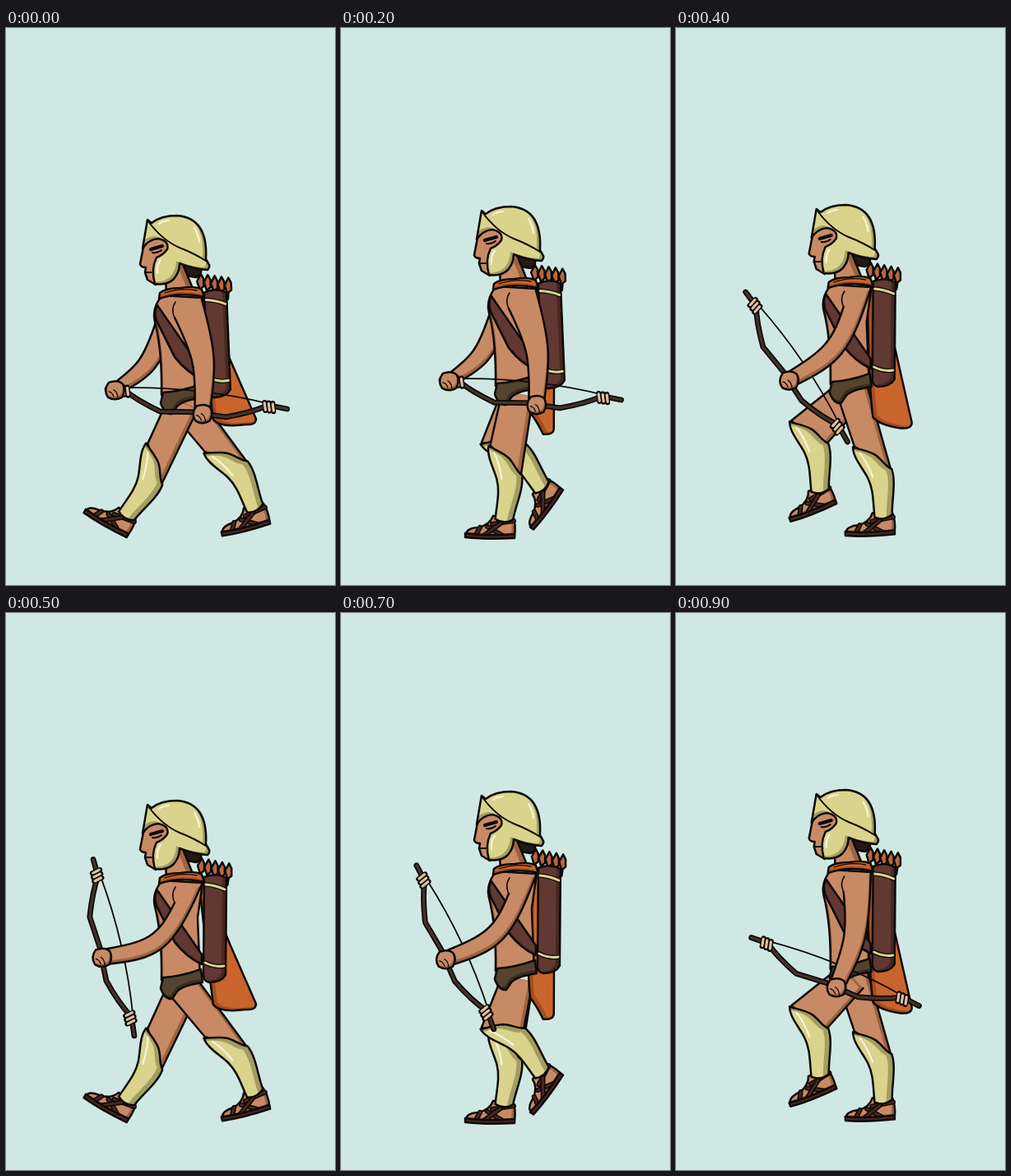
Recreate the animation shown at these times as an HTML page with a canvas. Size 400 by 677 pixels, loop 1000 ms.

```html
<!DOCTYPE html>
<html lang="en">
<head>
<meta charset="utf-8">
<title>Walking archer</title>
<style>
html, body { margin: 0; width: 100%; height: 100%; overflow: hidden; background: #d0e8e4; }
canvas { display: block; width: 400px; height: 677px; }
</style>
</head>
<body>
<canvas id="stage"></canvas>
<script>
const canvas = document.getElementById('stage');
const c = canvas.getContext('2d');
const ratio = window.devicePixelRatio || 1;
canvas.width = 400 * ratio;
canvas.height = 677 * ratio;

const BG = '#d0e8e4', INK = '#0d0907';
const SKIN = '#c78a65', SKIN_D = '#9c633f';
const GOLD = '#dad38b', GOLD_D = '#a49d62', SHINE = '#f7f4dc';
const LEATHER = '#613832', LEATHER_D = '#472722';
const CLOTH = '#c9652c', CLOTH_D = '#a54e20';
const WOOD = '#46322a', BELT = '#55432f', BELT_D = '#3a2d20', TAPE = '#dcc0a0';

const POSES = 10, STEP = 100, RAD = Math.PI / 180;
// rise and fall of the body over one step
const BOB = [0, 4, -11, -14, -13];
// one leg through a full stride: ankle x, ankle y, shin tilt
const STRIDE = [
  [145, 593, 16], [187, 597, -12], [197, 598, -11], [226, 597, -17], [251, 594, -23],
  [302, 585, -42], [303, 560, -56], [244, 560, -54], [213, 566, -40], [174, 563, -23]
];

const mix = (p, q, t) => [p[0] + (q[0] - p[0]) * t, p[1] + (q[1] - p[1]) * t];
const add = (p, q, k = 1) => [p[0] + q[0] * k, p[1] + q[1] * k];
const polar = (deg, size) => [Math.cos(deg * RAD) * size, Math.sin(deg * RAD) * size];
// cosine over the loop, `n` waves, with its crest at `peak`
const wave = (i, peak, n = 1) => Math.cos(2 * Math.PI * n * (i - peak) / POSES);

function normal(p, q) {
  const dx = q[0] - p[0], dy = q[1] - p[1], size = Math.hypot(dx, dy);
  return [-dy / size, dx / size];
}

function line(d, color = INK, width = 2) {
  c.strokeStyle = color;
  c.lineWidth = width;
  c.stroke(new Path2D(d));
}

function part(d, fill, shade, dx = -4, dy = -3) {
  const p = new Path2D(d);
  c.save();
  c.clip(p);
  c.fillStyle = shade || fill;
  c.fill(p);
  if (shade) {
    c.translate(dx, dy);
    c.fillStyle = fill;
    c.fill(p);
  }
  c.restore();
  line(d, INK, 2.5);
}

function at([x, y], turn, draw) {
  c.save();
  c.translate(x, y);
  c.rotate(turn * RAD);
  draw();
  c.restore();
}

function foot() {
  part('M-12 -5Q-16 6 -30 9Q-45 10 -45 18L14 19Q16 5 12 -5Z', SKIN, SKIN_D);
  for (const d of ['M-13 5L13 1', 'M-19 8L-2 18', 'M-3 4L-22 18', 'M-28 9L-33 18']) {
    line(d, INK, 6);
    line(d, LEATHER_D, 3);
  }
  part('M-46 16Q-20 20 14 17L14 22Q-20 24 -46 21Z', LEATHER_D);
}

function greave() {
  part('M0 0C6 6 15 11 21 19C27 28 27 37 33 43C32 60 18 78 12 94Q0 98 -9 89C-4 72 3 58 2 42C1 28 -5 12 0 0Z',
    GOLD, GOLD_D, -7, -1);
  line('M5 10Q9 25 8 43', SHINE, 2.2);
}

function leg([x, y, tilt], hip) {
  const shin = polar(tilt + 90, 1), across = polar(tilt, 1);
  const knee = add([x, y], shin, -92);
  const calf = add(add(knee, across, 32), shin, 42);
  const side = normal(hip, mix(knee, calf, 0.5));
  const lift = Math.min(1, (598 - y) / 36);
  part(`M${add(hip, side, 19)}L${add(knee, across, 2)}L${calf}L${add(hip, side, -19)}`, SKIN, SKIN_D, -5, -1);
  at([x, y], tilt > 0 ? tilt * 1.8 : tilt * lift, foot);
  at(knee, tilt, greave);
}

function arm(inner, outer, hand, bend, upper, lower) {
  const mid = mix(inner, outer, 0.5);
  const n = normal(mid, hand);
  const elbow = add(mix(mid, hand, 0.5), n, -bend);
  const w = normal(elbow, hand);
  const edge = (start, s) => {
    const e = add(elbow, n, upper * s), end = add(hand, w, lower * s);
    return [mix(start, e, 0.92), mix(end, e, 0.85), end];
  };
  const a = edge(inner, 1), b = edge(outer, -1);
  part(`M${inner}C${a[0]} ${a[1]} ${a[2]}L${b[2]}C${b[1]} ${b[0]} ${outer}`, SKIN, SKIN_D, -2, -4);
}

function fist(p) {
  at(p, 0, () => {
    part('M-7 -9Q4 -13 10 -7Q14 1 9 9Q0 14 -8 9Q-14 0 -7 -9Z', SKIN, SKIN_D, -2, -3);
    line('M-7 2Q-3 3 -1 8M-1 0Q3 2 4 9', INK, 1.3);
  });
}

function bow() {
  line('M24 -4Q111 -15 198 -4', INK, 1.8);
  const stave = 'M2 0L23 -1Q40 10 69 20Q91 18 113 16Q131 18 149 18Q178 10 199 -2L222 0';
  line(stave, INK, 6.8);
  line(stave, WOOD, 3.2);
  for (const x of [16, 21, 26, 194, 199, 204]) {
    line(`M${x} -5L${x + 2} 5`, INK, 6);
    line(`M${x} -4L${x + 2} 4`, TAPE, 3.2);
  }
}

function quiver() {
  for (let k = 0; k < 5; k++) {
    const x = 238 + k * 8.3, y = 298 + k * 1.6;
    line(`M${x} ${y + 12}L${x - 2} ${y + 26}`, INK, 3);
    part(`M${x} ${y}L${x - 5} ${y + 9}L${x - 2} ${y + 19}L${x + 3} ${y + 15}L${x + 3} ${y + 6}Z`, '#b9683c');
  }
  part('M241 321Q254 315 268 322L267 440Q262 449 247 449Q240 447 240 441Z', LEATHER, LEATHER_D, -5, -2);
  for (const d of ['M243 330Q255 331 266 336', 'M242 425Q254 431 265 429']) {
    line(d, INK, 5.5);
    line(d, GOLD, 3);
  }
}

// The hem flies out on each long step.
function cape(i, [dx, dy]) {
  const flare = 0.5 + 0.5 * wave(i, 0, 2);
  const left = [230 + 22 * flare * flare, 467 + 9 * flare];
  const tip = [254 + 50 * flare, 488 - 13 * flare];
  const low = [tip[0] - 13, tip[1] + 7];
  const back = [259 + dx + 13 * flare, 402 + dy];
  part(`M${234 + dx} ${322 + dy}Q${add(left, [-6, -45])} ${left}Q${add(left, [8, 10])} ${low}` +
    `Q${add(tip, [0, 8])} ${tip}L${back}L${240 + dx} ${322 + dy}Z`, CLOTH, CLOTH_D, 5, -3);
}

function torso() {
  part('M190 325Q177 340 181 357Q190 392 189 446L236 446L233 370L239 328Z', SKIN, SKIN_D, 2, -3);
  part('M184 337L238 415L238 427Q220 419 205 400L183 356Q179 344 184 337Z', LEATHER, LEATHER_D, 1, -2);
  part('M191 443Q212 442 237 433L239 449Q214 453 208 460L202 469Q193 470 188 456Z', BELT, BELT_D, -2, -4);
}

function head() {
  part('M212 284L236 289Q240 300 231 303L214 300Z', '#251912');
  part('M194 302L195 324L230 324L213 282Z', SKIN, SKIN_D, -6, 3);
  part('M187 322Q194 316 212 316Q230 313 238 318L241 327Q212 320 186 329Z', CLOTH, CLOTH_D, -1, -3);
  line('M193 322Q214 315 232 319', INK, 1.3);
  part('M169 256L163 287Q164 291 170 291L169 297L172 306L182 312L206 290L200 255Z', SKIN, SKIN_D, -5, -1);
  part('M172 233L166 268Q173 257 185 256Q199 259 196 269Q191 276 183 279Q176 293 181 311Q196 313 204 305' +
    'Q211 297 211 286Q228 293 245 294Q249 290 246 286L243 281Q246 231 208 228Q188 228 177 237Z',
    GOLD, GOLD_D, -4, -3);
  line('M173 235Q190 258 211 267Q229 274 243 283');
  line('M229 243Q234 251 235 260M186 238Q191 234 198 234M188 282Q183 288 184 298', SHINE, 2.2);
  line('M176 269L190 265', INK, 4.2);
  line('M178 273Q184 274 189 270', INK, 2);
  line('M170 297L177 297', INK, 1.8);
}

function draw(i) {
  const dy = BOB[i % 5], body = [dy / 10, dy];
  const hip = add([216, 455], body);
  // the near arm is a pendulum, and the bow turns with it
  const swing = 21.3 - 35.5 * wave(i, 0.85) + 3.5 * wave(i, 4, 2);
  const reach = swing < 0;
  const hand = add(add([220, 340], body), polar(90 + swing, 130));
  const tilt = 12.5 + 0.82 * swing + 0.0075 * swing * swing;
  const along = polar(tilt, 1), away = polar(tilt + 90, 1);
  const bowTip = add(add(hand, along, -120), away, -17);
  const farHand = add(bowTip, along, 11);

  c.setTransform(ratio, 0, 0, ratio, 0, 0);
  c.fillStyle = BG;
  c.fillRect(0, 0, 400, 677);
  c.lineJoin = c.lineCap = 'round';

  if (reach) arm(add([182, 358], body), add([202, 374], body), farHand, 16, 11, 7);
  leg(STRIDE[(i + 5) % POSES], hip);
  leg(STRIDE[i], hip);
  cape(i, body);
  at(body, 0, () => {
    torso();
    at([0, 0], 0, () => {
      c.translate(254, 322);
      c.rotate(reach ? -0.05 : 0);
      c.translate(-254, -322);
      quiver();
    });
    head();
  });
  at(bowTip, tilt, bow);
  if (reach) fist(farHand);
  arm(add([205, 352], body), add([238, 330], body), hand, 14 + 0.008 * swing * swing, 13.5, 9);
  at(body, 0, () => line('M205 352Q200 342 206 333', INK, 1.6));
  fist(hand);
}

const start = performance.now();
function tick(now) {
  draw(Math.floor(Math.max(0, now - start) / STEP) % POSES);
  requestAnimationFrame(tick);
}
draw(0);
requestAnimationFrame(tick);
</script>
</body>
</html>
```
